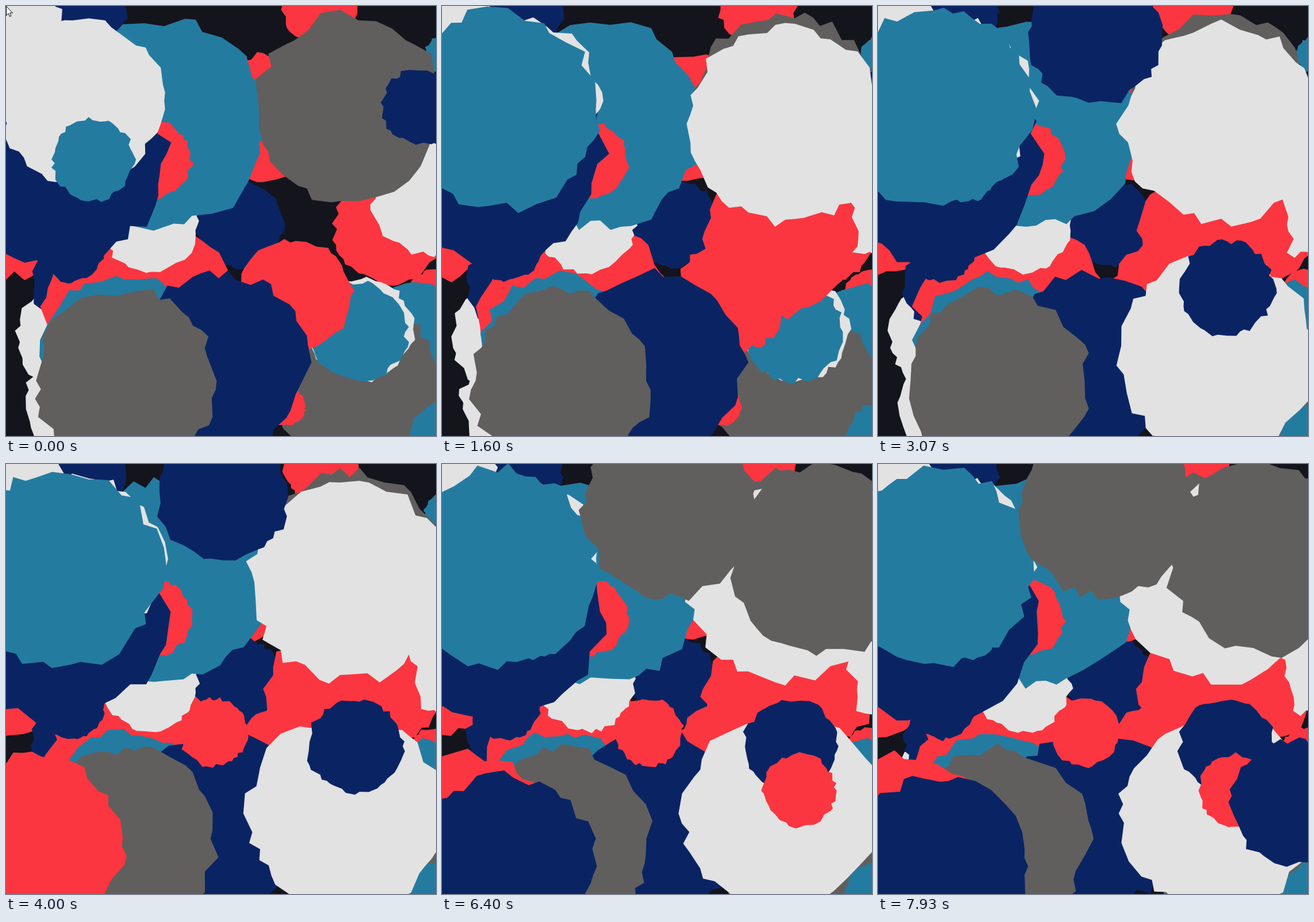
Write an HTML page with a canvas that moves like this. It is 748 px wide and 748 px high and loops after 8000 ms.

```html
<!DOCTYPE html>
<html lang="en">
<head>
<meta charset="utf-8">
<title>Jagged discs</title>
<style>
  html, body { margin: 0; width: 100%; height: 100%; overflow: hidden; background: #14141d; }
  canvas { display: block; width: 100vw; height: 100vh; }
</style>
</head>
<body>
<canvas id="stage" width="748" height="748"></canvas>
<script>
const SIZE = 748, FPS = 15, FRAMES = 120;
const ctx = document.getElementById('stage').getContext('2d');
const color = { n: '#0a2463', r: '#fb3640', g: '#605f5e', t: '#247ba0', w: '#e2e2e2' };

// color x y radius, bottom to top
const standing = `
  t 760 85 32; r 548 0 67; r 437 197 110; n 148 10 62; r 0 315 157;
  w 120 575 100; w 150 690 115; n 140 480 95; n 405 378 76; r 235 540 168;
  w 252 382 83; t 275 205 178; r 257 267 66; n 90 257 189; n 113 422 57;
  w 5 55 100; w 130 165 143; t 151 267 71; r 745 505 46; r 665 388 95;
  t 725 637 153; w 735 335 98; g 612 665 147; w 618 562 90; t 612 567 86;
  t 778 765 80; r 488 697 33; r 504 505 97; t 205 610 142; n 370 620 155;
  g 208 652 157; g 598 178 163; n 720 175 66`;

// the last value is the half-second slot in which the disc pops in
const arriving = `
  t 97 181 172 0; r 588 405 133 1; w 597 205 172 2; n 377 57 114 3;
  w 592 608 170 4; n 607 491 82 5; r 45 665 160 6; r 360 467 59 7;
  n 108 700 157 8; r 622 568 63 9; g 398 80 152 11; g 668 165 165 12;
  n 722 588 109 14`;

const parse = text => text.split(';').map(row => {
  const [key, ...values] = row.trim().split(/\s+/);
  const [x, y, r, slot] = values.map(Number);
  return { fill: color[key], x, y, r, from: slot === undefined ? 0 : Math.round(4 + slot * 7.5) };
});
const discs = [...parse(standing), ...parse(arriving)];

function randomizer(seed) {
  return () => {
    seed = (seed + 0x6D2B79F5) | 0;
    let v = Math.imul(seed ^ (seed >>> 15), seed | 1);
    v ^= v + Math.imul(v ^ (v >>> 7), v | 61);
    return ((v ^ (v >>> 14)) >>> 0) / 4294967296;
  };
}

function drawDisc({ fill, x, y, r }, random) {
  const steps = 64;
  ctx.fillStyle = fill;
  ctx.beginPath();
  for (let i = 0; i < steps; i += random() < 0.55 ? 1 : 2) {
    const angle = i / steps * 2 * Math.PI;
    const reach = r * (0.935 + 0.13 * random());
    ctx.lineTo(x + reach * Math.cos(angle), y + reach * Math.sin(angle));
  }
  ctx.fill();
}

function drawCursor() {
  const arrow = new Path2D('M.5 .5V16.5L4.2 13L6.6 18.3L9 17.2L6.7 12H11.5Z');
  ctx.fillStyle = '#fff';
  ctx.strokeStyle = '#000';
  ctx.lineWidth = 1;
  ctx.fill(arrow);
  ctx.stroke(arrow);
}

function draw(frame) {
  ctx.fillStyle = '#14141d';
  ctx.fillRect(0, 0, SIZE, SIZE);
  discs.forEach((disc, i) => {
    if (frame >= disc.from) drawDisc(disc, randomizer(frame * 7919 + i * 104729));
  });
  if (frame === 0) drawCursor();
}

const start = performance.now();
let shown = -1;
function tick() {
  const elapsed = performance.now() - start;
  const frame = Math.floor(elapsed * FPS / 1000) % FRAMES;
  if (frame !== shown) draw(shown = frame);
  requestAnimationFrame(tick);
}
tick();
</script>
</body>
</html>
```
